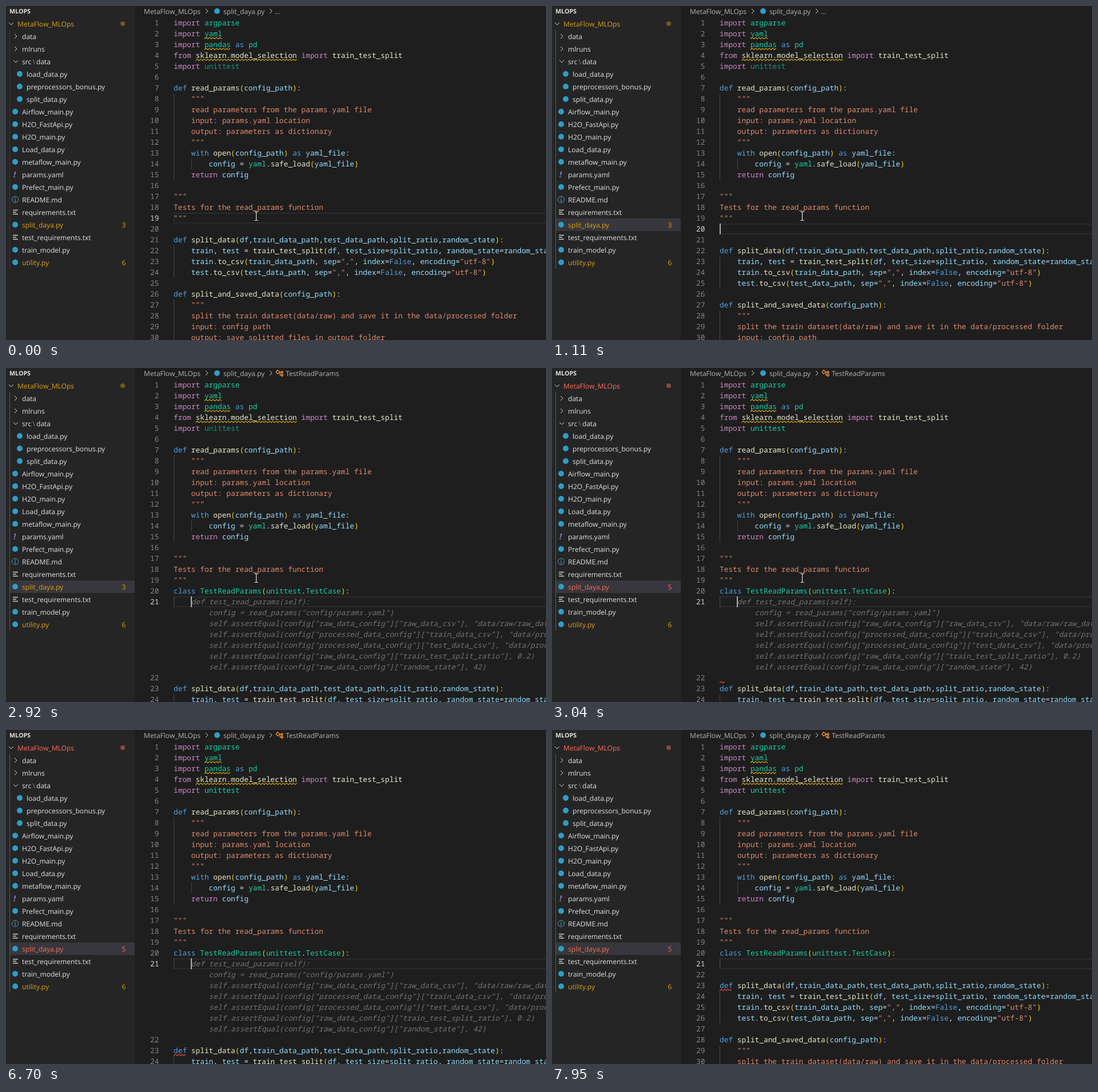
An HTML page that plays this animation: 944x585 px, repeating every 8000 ms.

```html
<!DOCTYPE html>
<html lang="en">
<head>
<meta charset="utf-8">
<title>Editor session</title>
<style>
  html, body { margin: 0; width: 100%; height: 100%; overflow: hidden; background: #1e1e1e; }
  svg { display: block; width: 944px; height: 585px; }
  text { white-space: pre; text-rendering: geometricPrecision; }
  .ui { font: 12.050px "Open Sans", "Noto Sans", sans-serif; fill: #e2e2e2; }
  .title { font-size: 10.7px; font-weight: 700; }
  .crumb { fill: #b4b4b4; }
  .code { font: 500 12.833px "Noto Sans Mono", "DejaVu Sans Mono", monospace; fill: #dcdcdc; }
  .num { fill: #858585; text-anchor: end; font-weight: 400; }
  .num.on { fill: #d6d6d6; }
  .ghost { fill: #727272; font-style: italic; font-weight: 400; }
  .flow { fill: #cc86c6; } .word { fill: #4f9fe0; } .type { fill: #14d0a6; }
  .func { fill: #e8e8cc; } .name { fill: #92deff; } .str { fill: #e08a6c; } .paren { fill: #ffd700; }
  .warn { fill: #dca012; } .err { fill: #ff6a58; }
  .line { fill: none; stroke: #d0d0d0; }
  .guide { stroke: #454545; }
  .wave { fill: none; stroke: #dcae08; stroke-width: 1.1; }
  .wave.bad { stroke: #ff4a4a; }
</style>
</head>
<body>
<svg id="stage" viewBox="0 0 944 585" xmlns="http://www.w3.org/2000/svg"></svg>
<script>
const LOOP = 8000, CHAR = 7.7, ROW = 19, LEFT = 293;
const rowTop = n => 20 + ROW * (n - 1);

const head = `import argparse
import yaml
import pandas as pd
from sklearn.model_selection import train_test_split
import unittest

def read_params(config_path):
    """
    read parameters from the params.yaml file
    input: params.yaml location
    output: parameters as dictionary
    """
    with open(config_path) as yaml_file:
        config = yaml.safe_load(yaml_file)
    return config

"""
Tests for the read_params function
"""`;

const tail = `def split_data(df,train_data_path,test_data_path,split_ratio,random_state):
    train, test = train_test_split(df, test_size=split_ratio, random_state=random_state)
    train.to_csv(train_data_path, sep=",", index=False, encoding="utf-8")
    test.to_csv(test_data_path, sep=",", index=False, encoding="utf-8")

def split_and_saved_data(config_path):
    """
    split the train dataset(data/raw) and save it in the data/processed folder
    input: config path
    output: save splitted files in output folder`;

const classLine = 'class TestReadParams(unittest.TestCase):';

const suggestion = `    def test_read_params(self):
        config = read_params("config/params.yaml")
        self.assertEqual(config["raw_data_config"]["raw_data_csv"], "data/raw/raw_data.csv")
        self.assertEqual(config["processed_data_config"]["train_data_csv"], "data/processed/train.csv")
        self.assertEqual(config["processed_data_config"]["test_data_csv"], "data/processed/test.csv")
        self.assertEqual(config["raw_data_config"]["train_test_split_ratio"], 0.2)
        self.assertEqual(config["raw_data_config"]["random_state"], 42)`;

const words = {
  flow: ['import', 'from', 'return'],
  word: ['def', 'class', 'as', 'with', 'False'],
  type: ['argparse', 'yaml', 'pandas', 'pd', 'unittest', 'TestCase', 'TestReadParams'],
  func: ['sklearn', 'model_selection', 'train_test_split']
};

function kind(token, next) {
  if (token[0] === '"') return 'str';
  if (/[()]/.test(token)) return 'paren';
  for (const k in words) if (words[k].includes(token)) return k;
  return next === '(' ? 'func' : 'name';
}

const paint = s => s.replace(/"[^"]*"|\w+|[()]/g, (w, i) =>
  `<tspan class="${kind(w, s[i + w.length])}">${w}</tspan>`);

function textRow(s, n, cls, body) {
  const indent = s.search(/\S/);
  if (indent < 0) return '';
  return `<text class="code ${cls}" x="${LEFT + indent * CHAR}" y="${rowTop(n) + 14}">${body(s.trim())}</text>`;
}

function codeBlock(src) {
  let doc = false;
  return src.split('\n').map((s, i) => {
    const fence = s.includes('"""');
    const quoted = doc || fence;
    if (fence) doc = !doc;
    return textRow(s, i + 1, quoted ? 'str' : '', quoted ? x => x : paint);
  }).join('');
}

const ghostBlock = (src, n) =>
  src.split('\n').map((s, i) => textRow(s, n + i, 'ghost', x => x)).join('');

const guide = (x, from, to) =>
  `<path class="guide" d="M${x + .5} ${rowTop(from)}V${rowTop(to + 1)}"/>`;

function wave(col, len, n, cls = '') {
  const x = LEFT + col * CHAR, y = rowTop(n) + 18.5;
  let d = `M${x} ${y}`;
  for (let i = 1; i * 3 <= len * CHAR; i++) d += `L${x + i * 3} ${y - (i % 2) * 2.4}`;
  return `<path class="wave ${cls}" d="${d}"/>`;
}

const ui = (s, x, y, cls = '', id = '') => `<text class="ui ${cls}" id="${id}" x="${x}" y="${y}">${s}</text>`;
const right = (x, y) => `<path class="line" d="M${x - 2} ${y - 4}l4 4l-4 4"/>`;
const down = (x, y) => `<path class="line" d="M${x - 4} ${y - 2}l4 4l4-4"/>`;
const dot = (x, y) => `<circle cx="${x}" cy="${y}" r="5" fill="#2f9dc6"/>`;

const icons = {
  py: dot,
  yaml: (x, y) => `<text class="ui" x="${x - 3}" y="${y + 5}" style="font-size:14px;font-weight:700;font-style:italic;fill:#a074c4">!</text>`,
  md: (x, y) => `<circle cx="${x}" cy="${y}" r="5.5" fill="none" stroke="#519aba"/><path stroke="#519aba" stroke-width="1.4" d="M${x} ${y - 3.4}v1.6m0 1.2v4"/>`,
  txt: (x, y) => `<path stroke="#d0d0d0" stroke-width="1.4" d="M${x - 4} ${y - 3.5}h9m-9 3.5h6m-6 3.5h9"/>`
};

const files = ['load_data.py', 'preprocessors_bonus.py', 'split_data.py', 'Airflow_main.py', 'H2O_FastApi.py',
  'H2O_main.py', 'Load_data.py', 'metaflow_main.py', 'params.yaml', 'Prefect_main.py', 'README.md',
  'requirements.txt', 'split_daya.py', 'test_requirements.txt', 'train_model.py', 'utility.py'];

function sidebar() {
  let s = `<rect width="225" height="585" fill="#252526"/>
    <rect id="picked" x="6" y="372" width="219" height="22" fill="#37373d"/>
    <path id="treeGuide" d="M6.5 42V460" stroke="#585858"/>`;
  s += ui('MLOPS', 6, 13, 'title') + down(9, 31) + ui('MetaFlow_MLOps', 20, 36, 'warn', 'root');
  s += '<circle id="rootDot" cx="204" cy="31" r="4"/>';
  s += right(17, 53) + ui('data', 28, 58) + right(17, 75) + ui('mlruns', 28, 80);
  s += down(17, 97) + ui('src', 28, 102) + ui('<tspan fill="#8a8a8a">\\</tspan>', 46.5, 102) + ui('data', 53, 102);
  files.forEach((f, i) => {
    const y = 119 + 22 * i, dx = i < 3 ? 8 : 0;
    const open = f === 'split_daya.py', warn = open || f === 'utility.py';
    s += icons[f.split('.').pop()](16 + dx, y);
    s += ui(f, 28 + dx, y + 5, warn ? 'warn' : '', open ? 'openFile' : '');
    if (warn) s += ui(open ? 3 : 6, 202.5, y + 5, 'warn', open ? 'count' : '');
  });
  return s;
}

function breadcrumb() {
  return ui('MetaFlow_MLOps', 241, 14, 'crumb') + right(351, 9) + dot(369, 9) +
    ui('split_daya.py', 380, 14, 'crumb') + right(463, 9) + ui('...', 470, 14, 'crumb', 'dots') +
    `<g id="symbol"><path d="M475 3.5l3.5 3.5l-3.5 3.5l-3-3.5zM478 7.5h4m-3 0v5h3M482.5 5.5l2 2l-2 2l-2-2zM482.5 10.5l2 2l-2 2l-2-2z"
      fill="none" stroke="#ee8d38" stroke-width="1.3"/>${ui('TestReadParams', 489, 14, 'crumb')}</g>`;
}

let numbers = '';
for (let n = 1; n <= 30; n++) numbers += `<text class="code num" x="267.5" y="${rowTop(n) + 14}">${n}</text>`;

const stage = document.getElementById('stage');
stage.innerHTML = `
  <rect width="944" height="585" fill="#1e1e1e"/>
  <rect id="current" x="294" y="1" width="660" height="17" fill="none" stroke="#2a2a2a" stroke-width="2"/>
  <g id="numbers">${numbers}</g>
  ${guide(LEFT, 8, 15)}${guide(324, 14, 14)}
  <g id="head">${codeBlock(head)}</g>
  ${wave(7, 4, 2)}${wave(7, 6, 3)}${wave(5, 23, 4)}
  <g id="classRow">${textRow(classLine, 20, '', paint)}</g>
  <g id="classGhost">${ghostBlock(classLine, 20)}</g>
  <g id="bodyGuide">${guide(LEFT, 21, 21)}</g>
  <g id="bodyGhost">${ghostBlock(suggestion, 21)}</g>
  <g id="tail">${guide(LEFT, 2, 4)}${guide(LEFT, 7, 10)}${codeBlock(tail)}</g>
  <g id="error">${wave(0, 3, 1, 'bad')}</g>
  <g id="errorStub">${wave(0, 1.2, 1, 'bad')}</g>
  <rect id="caret" width="2" height="19" fill="#aeafad"/>
  ${breadcrumb()}
  ${sidebar()}
  <path id="beam" d="M-3-7.5h2.5l.5.5l.5-.5h2.5M0-7V7M-3 7.5h2.5l.5-.5l.5.5h2.5" fill="none" stroke="#fff"/>
  <path id="hand" d="M3 .5q1.5 0 1.5 1.5v4l4 1q1.5.5 1.5 2v4l-1.5 5h-6l-3-6q0-1.5 1.5-1V2q0-1.5 2-1.5z" fill="#fff" stroke="#111" stroke-width=".8"/>`;

const el = {};
stage.querySelectorAll('[id]').forEach(e => { if (e.id) el[e.id] = e; });
const nums = [...el.numbers.children];
const unused = el.head.children[4].lastElementChild;

// caret: from, to, x, line
const carets = [
  [150, 550, 315, 19], [1110, 2100, 293, 20], [2250, 2530, 600, 20], [2770, 3280, 323, 21],
  [3840, 4240, 323, 21], [4820, 5260, 323, 21], [5780, 6300, 323, 21], [6700, 7250, 323, 21]
];
// pointer: from, to, shape, x, y
const pointers = [
  [0, 4670, 'beam', 437.5, 368], [4670, 4820, 'beam', 585.5, 356], [5780, 6150, 'beam', 945.5, 363],
  [6850, 6970, 'beam', 933.5, 344], [6970, 7250, 'beam', 612.5, 69],
  [7250, 7370, 'hand', 294, 3], [7370, 7490, 'hand', 430, 1], [7490, 7640, 'hand', 558, -16]
];

const show = (e, on) => e.setAttribute('visibility', on ? 'visible' : 'hidden');
const move = (e, x, y) => e.setAttribute('transform', `translate(${x} ${y})`);
const active = (table, t) => table.find(r => t >= r[0] && t < r[1]);

function draw(t) {
  const line = t < 1110 ? 19 : t < 2770 ? 20 : 21;
  const ghost = t >= 2920 && t < 7950;
  const gap = ghost ? ROW * 6 : 0;
  const bad = t >= 3040;
  const tailY = ROW * (line + 1) + gap;

  move(el.current, 0, rowTop(line));
  nums.forEach((e, i) => {
    e.classList.toggle('on', i + 1 === line);
    move(e, 0, i >= 21 ? gap : 0);
  });
  move(el.tail, 0, tailY);
  move(el.error, 0, tailY);
  move(el.errorStub, 0, tailY - ROW);
  show(el.error, t >= 3280);
  show(el.errorStub, bad && t < 3280);
  show(el.classGhost, t >= 1420 && t < 2250);
  show(el.classRow, t >= 2250);
  show(el.bodyGhost, ghost);
  show(el.bodyGuide, line === 21);
  show(el.dots, t < 2530);
  show(el.symbol, t >= 2530);
  unused.setAttribute('opacity', bad ? 1 : .65);

  show(el.picked, t >= 150);
  el.treeGuide.setAttribute('opacity', t < 150 ? .4 : t < 270 ? .7 : 1);
  for (const e of [el.root, el.openFile, el.count]) e.setAttribute('class', 'ui ' + (bad ? 'err' : 'warn'));
  el.count.textContent = bad ? 5 : 3;
  el.rootDot.setAttribute('fill', bad ? '#8a4a44' : '#735a1b');

  const caret = active(carets, t);
  show(el.caret, caret);
  if (caret) move(el.caret, caret[2], rowTop(caret[3]));

  const p = active(pointers, t);
  show(el.beam, p && p[2] === 'beam');
  show(el.hand, p && p[2] === 'hand');
  if (p) move(el[p[2]], p[3], p[4]);
}

const start = performance.now();
function tick() {
  draw((performance.now() - start) % LOOP);
  requestAnimationFrame(tick);
}
tick();
</script>
</body>
</html>
```
